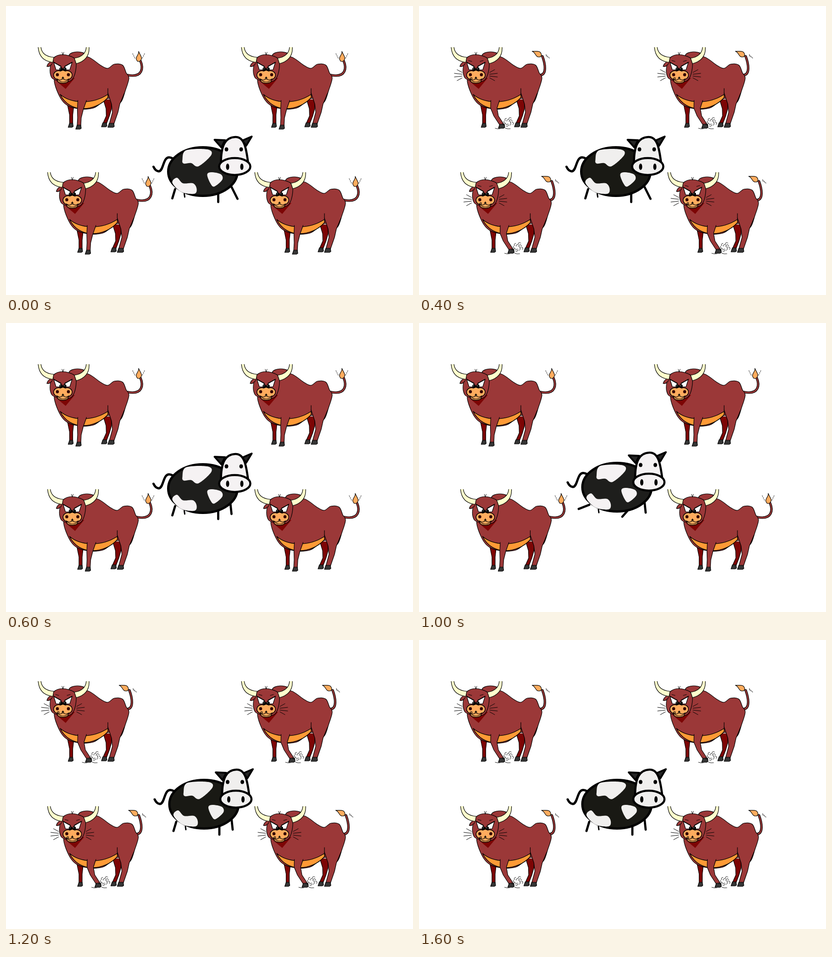
These frames come from a looping animation (887 by 631 pixels, 1.8 s). An HTML page with a canvas:

```html
<!DOCTYPE html>
<html lang="en">
<head>
<meta charset="utf-8">
<title>Bulls and cow</title>
<style>
html, body { margin: 0; width: 100%; height: 100%; overflow: hidden; background: #fff; }
canvas { display: block; }
</style>
</head>
<body>
<canvas id="stage" width="887" height="631"></canvas>
<script>
const ctx = document.getElementById('stage').getContext('2d');
const STEP = 200, STEPS = 9;
const HIDE = '#9b3838', DARK = '#7d0505', BELLY = '#ff9a36', SKIN = '#ffac5e';
const HORN = '#ffffcc', HOOF = '#353535', INK = '#000';
const SIDES = [-1, 1];

function paint(path, fill, width = 1.2) {
  if (fill) {
    ctx.fillStyle = fill;
    ctx.fill(path);
  }
  if (width) {
    ctx.lineWidth = width;
    ctx.strokeStyle = INK;
    ctx.stroke(path);
  }
}

const draw = (d, fill, width) => paint(new Path2D(d), fill, width);
const line = (x1, y1, x2, y2, width = 1) => draw(`M${x1},${y1}L${x2},${y2}`, null, width);

// Smooth closed outline through a few key points.
function blob(text, fill, width) {
  const points = text.split(' ').map(pair => pair.split(',').map(Number));
  const at = i => points[(i + points.length) % points.length];
  const path = new Path2D();
  path.moveTo(...at(0));
  points.forEach((b, i) => {
    const a = at(i - 1), c = at(i + 1), d = at(i + 2);
    path.bezierCurveTo(
      b[0] + (c[0] - a[0]) / 6, b[1] + (c[1] - a[1]) / 6,
      c[0] - (d[0] - b[0]) / 6, c[1] - (d[1] - b[1]) / 6, ...c);
  });
  path.closePath();
  paint(path, fill, width);
}

function oval(x, y, rx, ry, fill, width = 0) {
  const path = new Path2D();
  path.ellipse(x, y, rx, ry, 0, 0, Math.PI * 2);
  paint(path, fill, width);
}

// Tapered leg; each joint is a centre and a half width.
function bullLeg(fill, ...joints) {
  const side = s => joints.map(([x, y, w]) => [x + s * w, y]);
  const left = side(-1), right = side(1);
  draw('M' + [...left, ...right.slice().reverse()].join('L') + 'Z', fill, 0);
  [left, right].forEach(edge => draw('M' + edge.join('L'), null));
  const [x, y, w] = joints.at(-1);
  draw(`M${x - w},${y - 2}H${x + w}l1,7l-3,2H${x - w - 3}Z`, HOOF);
}

function bullTail(pawing) {
  const bend = pawing ? 'M264,151C279,150 275,126 269,110' : 'M266,151C299,157 299,134 293,120';
  draw(bend, null, 5.2);
  ctx.strokeStyle = HIDE;
  ctx.lineWidth = 2.8;
  ctx.stroke(new Path2D(bend));
  ctx.save();
  ctx.translate(...(pawing ? [267, 107] : [291, 121]));
  ctx.rotate(pawing ? -1.1 : 0);
  draw('M0,0C9,-7 2,-12 -2,-22C0,-14 -13,-9 -4,0Z', SKIN);
  ctx.restore();
  for (let i = 0; i < 3; i++) {
    if (pawing) line(277 + 3 * i, 106 + 3 * i, 278 + 3 * i, 110 + 2 * i);
    else SIDES.forEach(s => line(289 + s * (8 + 2 * i), 114 - 4 * i, 289 + s * (9 + 2 * i), 112 - 4 * i));
  }
}

function dust() {
  for (let i = 0; i < 11; i++) {
    const turn = i * 2.4, reach = 3 + i * 0.8;
    const path = new Path2D();
    path.arc(194 + reach * Math.cos(turn), 254 + 0.75 * reach * Math.sin(turn), 3, turn - 2, turn + 0.6);
    paint(path, null, 0.9);
  }
  SIDES.forEach(s => draw(`M${177 + s * 11},267q5,2 11,1`, null, 0.9));
}

function whiskers() {
  SIDES.forEach(s => {
    for (let i = 0; i < 4; i++) {
      line(124 + s * 30, 145 + 4 * i, 124 + s * (i % 3 ? 47 : 41), 139 + 8 * i);
    }
    line(124 + s * 9, 121, 124 + s * 16, 119);
  });
}

function bullFace(pawing) {
  ctx.save();
  ctx.translate(124, 0);
  SIDES.forEach(s => {
    draw(`M${s * 20},123L${s * 5},131L${s * 3},140L${s * 15},139Z`, '#fff');
    line(s * 20, 123, s * 4, 132, 2);
  });
  // The outline pass comes first so the lobes merge into one muzzle.
  [1.4, 0].forEach(width => {
    oval(0, 163, 11, 5, SKIN, width * 2);
    SIDES.forEach(s => oval(s * 9.5, 151, 10, 9, SKIN, width * 2));
    oval(0, 146, 6, 5, SKIN, width * 2);
  });
  SIDES.forEach(s => {
    oval(s * 4, 138, 3.8, 4, INK);
    oval(s * 4 - 1, 137, 0.8, 0.8, '#fff');
    oval(s * 12, 150, 3.3, 3.5, '#300');
    draw(`M0,159Q${s * 7},164 ${s * 13},159`, null);
  });
  draw('M-9,163Q0,169 10,163', null);
  if (pawing) ctx.strokeRect(-11.5, 156.5, 3, 4);
  ctx.restore();
  if (pawing) whiskers();
}

function bullHead(pawing) {
  draw('M105,159L118,171L130,181L150,157Z', DARK, 0);
  blob('104,113 124,106 149,114 153,130 148,154 136,165 106,161 97,150 97,130', HIDE);
  draw('M104,120Q92,121 89,132Q96,134 101,125', HIDE);
  draw('M70,89Q72,120 102,123L104,112Q78,110 76,89', HORN);
  draw('M181,89Q183,118 153,126L149,114Q174,110 175,89', HORN);
  SIDES.forEach(s => line(124, 107, 124 + 2 * s, 101));
  bullFace(pawing);
}

function bull(x, y, pawing) {
  ctx.save();
  ctx.translate(x, y);
  ctx.beginPath();
  ctx.rect(60, 90, 250, 190);
  ctx.clip();
  bullTail(pawing);
  bullLeg(DARK, [141, 216, 7], [142, 238, 3.5], [142, 258, 3.5]);
  bullLeg(DARK, [221, 204, 9], [224, 224, 6], [222, 240, 3.5], [215, 257, 4]);
  oval(156, 109, 19, 9, HIDE, 1.2);
  blob('178,111 207,130 222,136 236,127 254,129 262,146 268,157 261,182 248,212 ' +
    '222,202 190,223 150,223 122,206 105,160 125,135 150,116', HIDE);
  draw('M118,193C140,212 185,217 222,193V200C195,230 140,237 118,193', BELLY, 1.4);
  line(222, 180, 222, 192, 1.2);
  bullLeg(HIDE, [240, 190, 18], [239, 214, 9], [238, 232, 6], [230, 258, 5]);
  if (pawing) {
    bullLeg(HIDE, [166, 206, 9.5], [163, 223, 7], [168, 240, 5], [181, 260, 5]);
    dust();
  } else {
    bullLeg(HIDE, [166, 206, 9.5], [162, 226, 6.5], [160, 244, 4], [159, 262, 4]);
  }
  bullHead(pawing);
  ctx.restore();
}

function cowLegs(kick, gallop) {
  const leg = (x, y, dx, dy) => line(x, y, x + dx, y + dy, 4.8);
  leg(371, 397, ...(gallop ? [-23, 9] : [-6, 20]));
  leg(465, 398, ...(gallop ? [-22, 25] : [0, 27]));
  leg(491, 386, ...(kick ? [16, 32] : [3, 28]));
  line(391, 407, 392, 414, 3);
}

function cow(x, y, kick, gallop, pawing) {
  const white = pawing ? '#f0efee' : '#f5f2f3';
  const black = pawing ? '#191914' : '#1e1e1c';
  ctx.save();
  ctx.translate(x, y);
  cowLegs(kick, gallop);
  draw('M366,330C343,317 348,358 335,358Q328,357 324,348', null, 5);
  oval(431.5, 358.5, 75.5, 53, black, 5);
  blob('387,333 395,312 441,310 450,322 422,347 406,340 390,341', white, 0);
  blob('365,383 375,372 388,384 410,384 418,396 413,407 385,403', white, 0);
  blob('441,366 449,360 470,364 474,376 457,391 449,386', white, 0);
  draw('M457,289L480,290L472,306Z', '#262626', 4);
  draw('M517,291L538,282L526,302Z', '#262626', 4);
  draw('M471,340C471,300 481,284 502,283C522,282 526,308 530,338', white, 4.6);
  oval(501, 347.5, 34, 18.5, white, 4.6);
  SIDES.forEach(s => {
    oval(499 + s * 16, 310, 4, 4.5, INK);
    oval(501 + s * 15.5, 348, 3.5, 7, INK);
  });
  ctx.restore();
}

ctx.lineCap = ctx.lineJoin = 'round';
const start = performance.now();

function frame(now) {
  const step = Math.floor(Math.max(0, now - start) / STEP) % STEPS;
  const even = step % 2 === 0, early = step < 4;
  const pawing = even && step > 0;
  ctx.fillStyle = '#fff';
  ctx.fillRect(0, 0, 887, 631);
  [[0, 0], [443, 0], [20.5, 273], [472, 273]].forEach(([x, y]) => bull(x, y, pawing));
  const lift = step === 4 ? -7 : 0;
  cow(early ? -2.5 : 0, early ? 3 : lift, early && even, !early && !even, pawing);
  requestAnimationFrame(frame);
}
frame(start);
</script>
</body>
</html>
```
